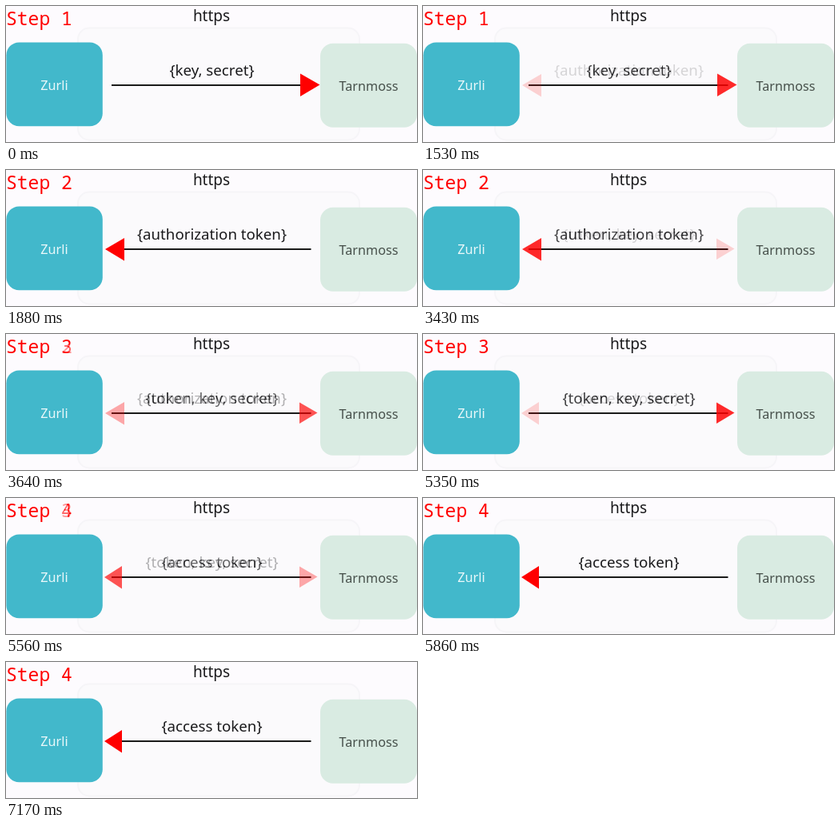
Recreate the animation shown at these times as an HTML page. Size 514 by 170 pixels, loop 7250 ms.

```html
<!DOCTYPE html>
<html lang="en">
<head>
<meta charset="utf-8">
<title>Token exchange in four steps</title>
<style>
  html, body { margin: 0; width: 100%; height: 100%; overflow: hidden; background: #fdfbfe; }
  svg { display: block; width: 100%; height: 100%; }
  text { font-family: "Noto Sans", "Open Sans", sans-serif; font-size: 18.7px; fill: #1a1a1c; }
  .middle { text-anchor: middle; }
  .step { font-family: "Noto Sans Mono", monospace; font-size: 23px; fill: #f00; }
  .name { font-size: 16.2px; }
  .line { stroke: #1a1a1a; stroke-width: 2; }
  .head { fill: #f00; }
  .paper { fill: #fdfbfe; }

  /* Opaque layers fade in over the previous ones, in six 70 ms steps; labels begin one step later. */
  .scene, .label { animation: 7250ms infinite; }
  .scene { animation-timing-function: steps(6, jump-start); }
  .label { animation-timing-function: steps(6, jump-none); }
  .second { animation-name: second; }
  .third { animation-name: third; }
  .fourth { animation-name: fourth; }
  @keyframes second { 0%, 21.103% { opacity: 0 } 26.896%, 100% { opacity: 1 } }
  @keyframes third { 0%, 47.31% { opacity: 0 } 53.103%, 100% { opacity: 1 } }
  @keyframes fourth { 0%, 73.793% { opacity: 0 } 79.586%, 100% { opacity: 1 } }
</style>
</head>
<body>
<svg viewBox="0 0 514 170">
  <defs>
    <g id="backdrop">
      <rect class="paper" width="514" height="170"/>
      <rect x="90" y="27.5" width="352" height="140" rx="14" fill="#fbfafc" stroke="#f6f5f8" stroke-width="2"/>
      <text class="middle" x="257" y="18.5" style="font-size:19px">https</text>
      <rect x="0.4" y="45.4" width="120.4" height="104.8" rx="16" fill="#42b8cb"/>
      <text class="middle name" x="60.5" y="104.5" style="fill:#eaf8fa">Zurli</text>
      <rect x="393" y="46.8" width="121" height="105" rx="16" fill="#d9ebe2"/>
      <text class="middle name" x="453.5" y="106" style="fill:#47504b">Tarnmoss</text>
    </g>
    <rect id="label-paper" class="paper" width="86" height="32"/>
  </defs>

  <g>
    <use href="#backdrop"/>
    <text class="middle" x="257.5" y="86.5">{key, secret}</text>
    <path class="line" d="M132 99H370"/>
    <path class="head" d="M368 84.5L392.5 98.5L368 113Z"/>
  </g>

  <g class="scene second">
    <use href="#backdrop"/>
    <text class="middle" x="257.5" y="86.5">{authorization token}</text>
    <path class="line" d="M146 99H381.5"/>
    <path class="head" d="M148 85L124 99L148 113.5Z"/>
  </g>

  <g class="scene third">
    <use href="#backdrop"/>
    <text class="middle" x="257.5" y="86.5">{token, key, secret}</text>
    <path class="line" d="M132 99H369"/>
    <path class="head" d="M367 85.5L389.5 98.5L367 112Z"/>
  </g>

  <g class="scene fourth">
    <use href="#backdrop"/>
    <text class="middle" x="257.5" y="86.5">{access token}</text>
    <path class="line" d="M143 99H381.5"/>
    <path class="head" d="M145 85L123 99L145 113.5Z"/>
  </g>

  <text class="step" y="23.5">Step 1</text>
  <g class="label second"><use href="#label-paper"/><text class="step" y="23.5">Step 2</text></g>
  <g class="label third"><use href="#label-paper"/><text class="step" y="23.5">Step 3</text></g>
  <g class="label fourth"><use href="#label-paper"/><text class="step" y="23.5">Step 4</text></g>
</svg>
</body>
</html>
```
